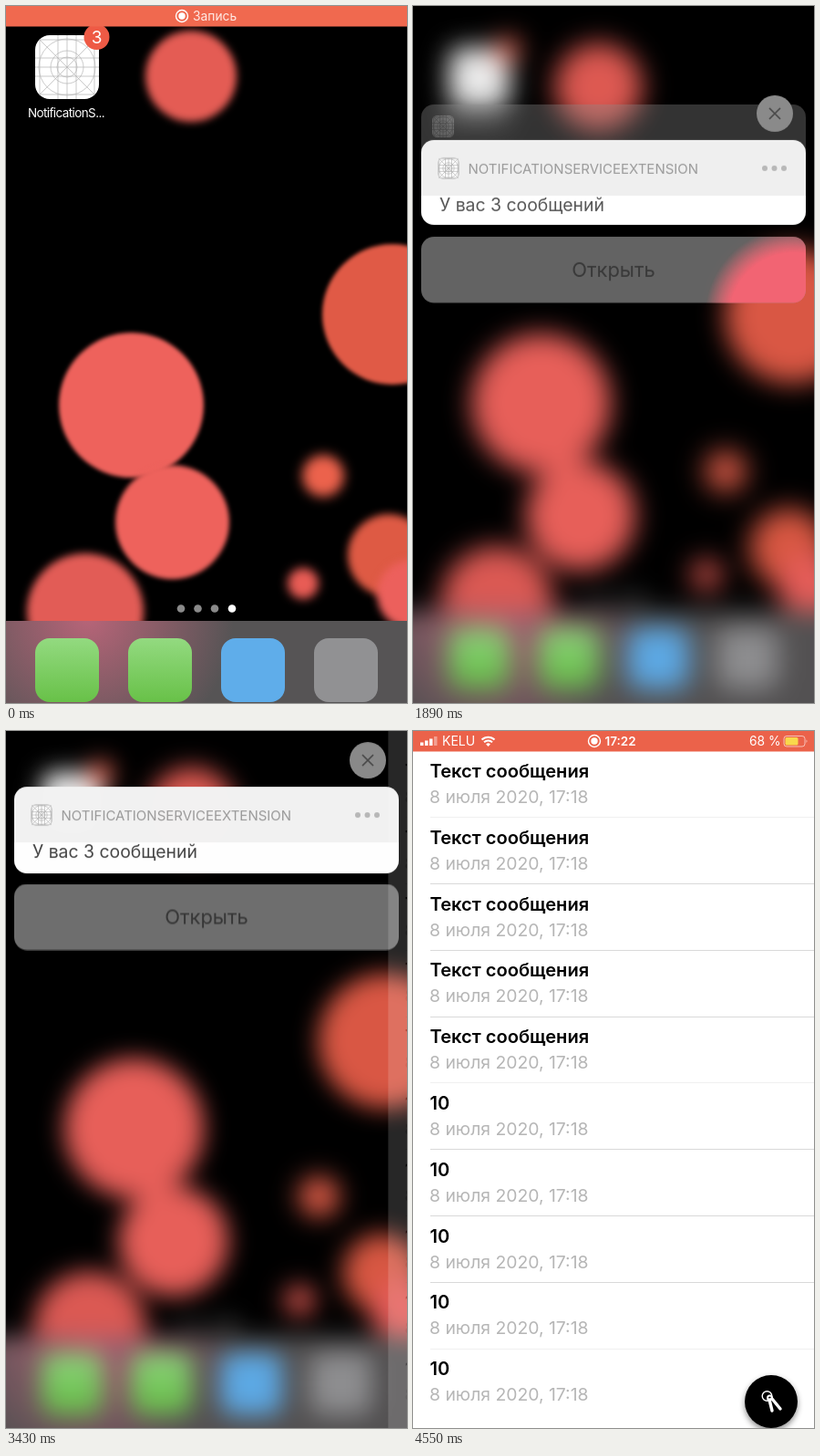
These frames come from a looping animation (440 px wide and 764 px high, 4.62 s). An HTML page:

```html
<!DOCTYPE html>
<html lang="ru">
<head>
<meta charset="utf-8">
<title>Уведомление</title>
<style>
  html, body { margin: 0; width: 100%; height: 100%; overflow: hidden; background: #000; }
  #stage { position: relative; width: 440px; height: 764px; overflow: hidden; background: #000; }
  .layer { position: absolute; inset: 0; }
  svg { display: block; position: absolute; left: 0; top: 0; overflow: visible; }
  text { font-family: Inter, "Open Sans", sans-serif; }
  .mid { text-anchor: middle; }
  .end { text-anchor: end; }
  .white { fill: #fff; }
  .caps { font-size: 15px; }
  .grid { fill: none; stroke: #b4b4b4; stroke-width: .7; }
  .grid * { vector-effect: non-scaling-stroke; }

  /* one loop is 66 ticks of 70 ms, 1.515% each */
  #home, #rec, #banner, #detail, #stack, #card, #shade, #open, #plate, #tint, .ink, #app, #bar {
    animation: 4620ms linear infinite both;
  }
  #home { transform-origin: 220px 382px; animation-name: home; }
  #rec { animation-name: rec; }
  #banner { animation-name: banner; }
  #detail { animation-name: detail; }
  #stack { animation-name: stack; }
  #card { animation-name: card; }
  #shade { animation-name: shade; }
  #open { animation-name: nudge; }
  .ink { animation-name: ink; }
  #plate { animation-name: plate; }
  #tint { animation-name: tint; }
  #app { animation-name: app; }
  #bar { animation-name: bar; }

  @keyframes home {
    0%, 30.3% { transform: scale(1); filter: blur(0) brightness(1); animation-timing-function: ease-in-out; }
    39.39%, 72.73% { transform: scale(.962); filter: blur(15px) brightness(.97); }
    74.24%, 100% { transform: scale(.964); filter: blur(13px) brightness(.97); }
  }
  @keyframes rec {
    0%, 1.5% { transform: none; animation-timing-function: ease-in-out; }
    7.58%, 100% { transform: translateY(-24px); }
  }
  @keyframes banner {
    0%, 1.515% { transform: translateY(-92px); opacity: 1; animation-timing-function: cubic-bezier(.2, .7, .3, 1); }
    12.12%, 30.3% { transform: none; opacity: 1; animation-timing-function: ease-in-out; }
    37.88% { transform: translateY(98px); opacity: 1; }
    40.91% { transform: translateY(100px); opacity: .37; }
    43.18%, 100% { transform: translateY(90px); opacity: 0; }
  }
  @keyframes detail {
    0%, 33.33% { opacity: 1; }
    40.91%, 100% { opacity: 0; }
  }
  @keyframes stack {
    0%, 37.88% { transform: translateY(98px); opacity: 0; }
    39.39% { transform: translateY(96px); opacity: 1; }
    40.91% { transform: translateY(88px); animation-timing-function: cubic-bezier(.3, .3, .3, 1); }
    51.52%, 72.73% { transform: none; opacity: 1; }
    74.24% { transform: translateY(2px); opacity: 1; }
    75.76% { transform: translateY(8px); opacity: .8; }
    78.79%, 100% { transform: translateY(24px); opacity: 0; }
  }
  @keyframes card {
    0%, 40.91% { height: 93px; }
    46.97%, 72.73% { height: 97px; }
    74.24% { height: 95px; }
    77.27%, 100% { height: 92px; }
  }
  @keyframes shade {
    0%, 37.88% { opacity: .2; }
    40.91% { opacity: .065; }
    45.45%, 72.73% { opacity: 0; }
    74.24% { opacity: .05; }
    77.27%, 100% { opacity: .2; }
  }
  @keyframes nudge {
    0%, 40.91% { transform: translateY(-1px); }
    46.97%, 72.73% { transform: none; }
    74.24%, 100% { transform: translateY(-.5px); }
  }
  @keyframes ink {
    0%, 37.88% { opacity: .4; }
    40.91% { opacity: .75; }
    45.45%, 72.73% { opacity: 1; }
    74.24% { opacity: .82; }
    77.27%, 100% { opacity: .4; }
  }
  @keyframes plate {
    0%, 37.88% { opacity: .3; }
    40.91% { opacity: .71; }
    45.45%, 72.73% { opacity: 1; }
    74.24% { opacity: .8; }
    77.27%, 100% { opacity: .3; }
  }
  @keyframes tint {
    0%, 37.88% { opacity: 0; }
    40.91% { opacity: 1; }
    45.45%, 100% { opacity: 0; }
  }
  /* critically damped slide */
  @keyframes app {
    0%, 73.8% { transform: translateX(440px); opacity: 0; }
    74.24% { transform: translateX(422px); opacity: .14; }
    75.76% { transform: translateX(256px); opacity: 1; }
    77.27% { transform: translateX(104px); }
    78.79% { transform: translateX(36px); }
    80.3% { transform: translateX(11px); }
    81.82% { transform: translateX(3px); }
    83.33% { transform: translateX(1px); }
    84.85%, 100% { transform: none; opacity: 1; }
  }
  @keyframes bar {
    0%, 84.85% { transform: translateY(-24px); animation-timing-function: ease-out; }
    90.91%, 100% { transform: none; }
  }
</style>
</head>
<body>
<div id="stage">
  <div class="layer" id="home">
    <svg width="440" height="764">
      <defs>
        <radialGradient id="rose" gradientUnits="userSpaceOnUse" cx="90" cy="670" r="160">
          <stop offset="0" stop-color="#d86a84" stop-opacity=".75"/>
          <stop offset="1" stop-color="#d86a84" stop-opacity="0"/>
        </radialGradient>
        <linearGradient id="green" x2="0" y2="1">
          <stop offset="0" stop-color="#93da80"/>
          <stop offset="1" stop-color="#68c148"/>
        </linearGradient>
        <radialGradient id="pale" gradientUnits="userSpaceOnUse" cx="62" cy="62" r="120">
          <stop offset="0" stop-color="#cfcfcf" stop-opacity=".85"/>
          <stop offset="1" stop-color="#cfcfcf" stop-opacity="0"/>
        </radialGradient>
        <radialGradient id="pink" gradientUnits="userSpaceOnUse" cx="205" cy="74" r="95">
          <stop offset="0" stop-color="#f28a9c"/>
          <stop offset=".4" stop-color="#ea8c9c" stop-opacity=".8"/>
          <stop offset="1" stop-color="#d09098" stop-opacity="0"/>
        </radialGradient>
        <radialGradient id="spot" gradientUnits="userSpaceOnUse" cx="418" cy="254" r="98">
          <stop offset=".72" stop-color="#f36473"/>
          <stop offset="1" stop-color="#f36473" stop-opacity="0"/>
        </radialGradient>
        <clipPath id="round"><rect width="70" height="70" rx="16"/></clipPath>
        <symbol id="tile" viewBox="0 0 70 70">
          <rect width="70" height="70" rx="16" fill="#fff"/>
          <g class="grid" clip-path="url(#round)">
            <path d="M5 0V70M25 0V70M35 0V70M45 0V70M65 0V70M0 5H70M0 25H70M0 35H70M0 45H70M0 65H70M0 0L70 70M70 0L0 70"/>
            <circle cx="35" cy="35" r="31"/>
            <circle cx="35" cy="35" r="18"/>
            <circle cx="35" cy="35" r="11"/>
          </g>
        </symbol>
      </defs>
      <g id="blobs"></g>
      <use href="#tile" x="32" y="32" width="70" height="70"/>
      <circle cx="99.500" cy="34" r="14" fill="#ee5a45"/>
      <text class="white mid" x="99.500" y="41" font-size="19">3</text>
      <text class="white mid" x="66" y="122" font-size="13.500" letter-spacing="-.6">NotificationS...</text>
      <g fill="#8a8a8a">
        <circle cx="192" cy="660.500" r="4.300"/>
        <circle cx="210.500" cy="660.500" r="4.300"/>
        <circle cx="229" cy="660.500" r="4.300"/>
        <circle cx="248" cy="660.500" r="4.300" fill="#fff"/>
      </g>
      <rect x="-60" y="674" width="560" height="150" fill="#565455"/>
      <rect x="-60" y="674" width="560" height="150" fill="url(#rose)"/>
      <rect x="32" y="693" width="70" height="70" rx="16" fill="url(#green)"/>
      <rect x="134" y="693" width="70" height="70" rx="16" fill="url(#green)"/>
      <rect x="236" y="693" width="70" height="70" rx="16" fill="#5fadea"/>
      <rect x="338" y="693" width="70" height="70" rx="16" fill="#919193"/>
    </svg>
  </div>

  <svg class="layer" width="440" height="764">
    <defs>
      <g id="dot">
        <circle r="6.500" fill="none" stroke="#fff" stroke-width="1.400"/>
        <circle r="3.700" fill="#fff"/>
      </g>
    </defs>

    <g id="rec">
      <rect width="440" height="22.500" fill="#f0694f"/>
      <use href="#dot" x="193" y="11"/>
      <text x="205" y="16" font-size="13.800" fill="#ffe9e4">Запись</text>
    </g>

    <g id="banner">
      <rect x="9" y="8" width="422" height="80" rx="14" fill="#8d8b8b"/>
      <g id="detail">
        <rect x="9" y="8" width="422" height="80" rx="14" fill="url(#pale)"/>
        <rect x="9" y="8" width="422" height="80" rx="14" fill="url(#pink)"/>
        <text class="caps" x="52.500" y="38" fill="#6a6466">NOTIFICATIONSERVICEEXTENSION</text>
        <text class="end" x="413" y="38" font-size="15" fill="#5f5d5d">сейчас</text>
        <text x="23.300" y="71" font-size="17.300" fill="#222">У вас 3 сообщений</text>
      </g>
      <use href="#tile" x="21" y="20" width="24" height="24"/>
    </g>

    <g id="stack">
      <circle cx="397" cy="30" r="20" fill="#8a8a8a"/>
      <path d="M391 24l12 12m0-12l-12 12" stroke="#484848" stroke-width="1.700"/>
      <rect id="card" x="9" y="59" width="422" height="97" rx="14" fill="#fff"/>
      <path id="shade" d="M9 120V73a14 14 0 0 1 14-14H417a14 14 0 0 1 14 14V120z"/>
      <use href="#tile" x="27" y="78" width="24" height="24"/>
      <rect x="27.500" y="78.500" width="23" height="23" rx="5.500" fill="none" stroke="#ccc"/>
      <text class="caps" x="60.500" y="96" fill="#9a9a9a">NOTIFICATIONSERVICEEXTENSION</text>
      <g fill="#b8b8b8">
        <circle cx="386" cy="90" r="3"/>
        <circle cx="396.500" cy="90" r="3"/>
        <circle cx="407" cy="90" r="3"/>
      </g>
      <text class="ink" x="29" y="136.700" font-size="19.400" fill="#1c1c1c">У вас 3 сообщений</text>
      <g id="open">
        <rect id="plate" x="9" y="166" width="422" height="72.500" rx="14" fill="#8c8c8c"/>
        <rect id="tint" x="9" y="166" width="422" height="72.500" rx="14" fill="url(#spot)"/>
        <text class="mid ink" x="220" y="210" font-size="21.900" fill="#2b2b2b">Открыть</text>
      </g>
    </g>

    <g id="app">
      <rect width="441" height="764" fill="#fff"/>
      <g id="rows"></g>
      <circle cx="393" cy="735" r="29" style="filter: drop-shadow(0 3px 3px rgba(0,0,0,.45))"/>
      <g fill="none" stroke="#fff" stroke-linecap="round">
        <circle cx="388.500" cy="729" r="5.300" stroke-width="1.400"/>
        <circle cx="391.500" cy="731" r="2.500" stroke-width="2"/>
        <path d="M391 733l3 12M394 732l9 11" stroke-width="3.400"/>
      </g>
    </g>

    <g id="bar">
      <rect width="440" height="22.500" fill="#eb624a"/>
      <g fill="#fff">
        <path d="M8 12.500h3.500V16H8zM13 10.500h3.500V16H13zM18 8.500h3.500V16H18z"/>
        <path d="M23 6h3.500V16H23z" opacity=".4"/>
        <text x="32" y="16" font-size="14">KELU</text>
        <path d="M82.500 17l-2.400-2.600a3.600 3.600 0 0 1 4.800 0z"/>
        <use href="#dot" x="199" y="11"/>
        <text x="210.500" y="16" font-size="13.500" font-weight="600">17:22</text>
        <text x="369" y="16" font-size="13.800">68 %</text>
      </g>
      <path d="M75.500 9.500a10 10 0 0 1 14 0M78 12.200a6.500 6.500 0 0 1 9 0" fill="none" stroke="#fff" stroke-width="2"/>
      <rect x="407" y="5.500" width="23" height="11.500" rx="3" fill="none" stroke="#fff" stroke-opacity=".6"/>
      <rect x="408.500" y="7" width="14" height="8.500" rx="1.500" fill="#f9d84c"/>
      <path d="M431.500 9.500q2 1.700 0 3.500z" fill="#fff" opacity=".6"/>
    </g>
  </svg>
</div>

<script>
  const add = (id, markup) => document.getElementById(id).innerHTML += markup;

  // x, y, radius, softness, colour
  const blobs = [
    [203, 77, 50, 4, '#e45c54'],
    [424, 338, 77, 2.2, '#e05a46'],
    [137.5, 437.5, 79.5, 2.2, '#ee625c'],
    [182.5, 565.7, 62.5, 2.5, '#ee625c'],
    [87, 664, 64, 4, '#e25c56'],
    [348, 515, 23, 6.5, '#ec624c'],
    [326, 633, 17, 5.5, '#e85c55'],
    [420, 602, 45, 4.5, '#de5a44'],
    [445, 645, 38, 4.5, '#ec605c'],
  ];
  add('blobs', blobs.map(([x, y, r, soft, fill]) =>
    `<circle cx="${x}" cy="${y}" r="${r}" fill="${fill}" style="filter:blur(${soft}px)"/>`).join(''));

  let rows = '';
  for (let i = 0; i < 10; i++) {
    const y = i * 72.8;
    const line = Math.floor(94.6 + y) + .5;
    rows += `<text x="18.5" y="${51 + y}" font-size="20.1" font-weight="600">${i < 5 ? 'Текст сообщения' : '10'}</text>
      <text x="18" y="${79 + y}" font-size="19.35" fill="#b6b6b6">8 июля 2020, 17:18</text>`;
    if (i < 9) rows += `<path d="M19 ${line}H441" stroke="${i % 4 ? '#d9d9d9' : '#f0f0f0'}"/>`;
  }
  add('rows', rows);
</script>
</body>
</html>
```
